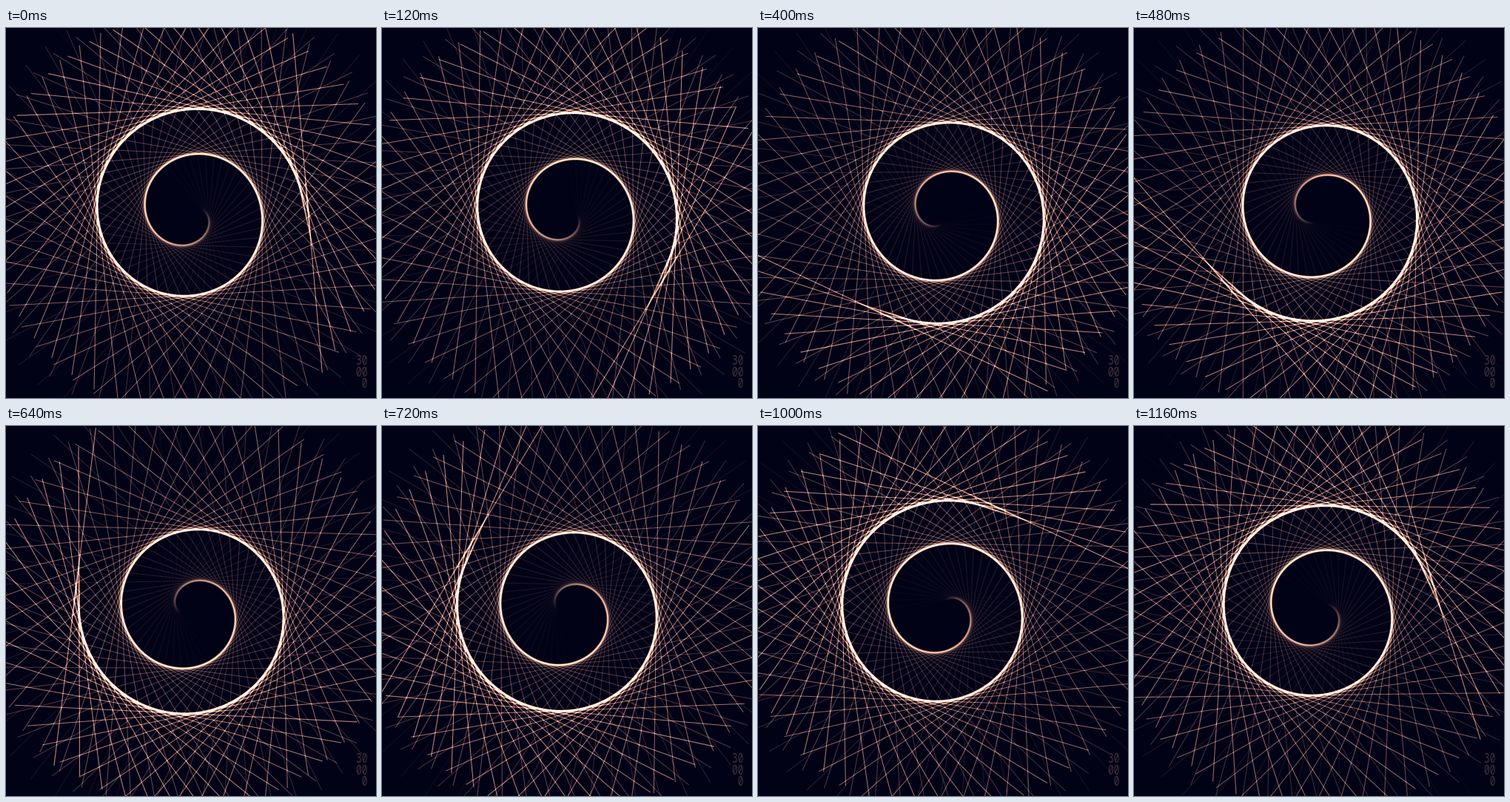
These frames come from a looping animation (500x500 px, 1200 ms). An HTML page with a canvas:

```html
<!DOCTYPE html>
<html lang="en">
<head>
<meta charset="utf-8">
<title>Spiral of lines</title>
<style>
  html, body { margin: 0; width: 100%; height: 100%; overflow: hidden; background: #020216; }
  canvas, svg { position: absolute; left: 0; top: 0; width: 500px; height: 500px; }
  text { font: 13px "Noto Sans Mono", "DejaVu Sans Mono", monospace; fill: #40323b; text-anchor: end; }
</style>
</head>
<body>
<canvas id="stage" width="500" height="500"></canvas>
<svg viewBox="0 0 500 500">
  <g transform="translate(488.5 455) scale(1 1.45)">
    <text y="0">30</text>
    <text y="10.8">00</text>
    <text y="21.4">0</text>
  </g>
</svg>
<script>
const ctx = document.getElementById('stage').getContext('2d');
const LOOP = 1200, STEPS = 30, LINES = 106;
const RAD = Math.PI / 180;
const START = -4.95, SPACING = 7.25, TURN = 360 / STEPS; // degrees

// The newest line stands a little further out than the rest of the spiral.
const distance = i => i === 0 ? 158 : 152.2 - 0.995 * i - 0.0031 * i * i;
const halfLength = (i, d) => i === 0 ? 230 : 335 - 0.745 * d;

function segment(x, y1, y2, width, style) {
  ctx.lineWidth = width;
  ctx.strokeStyle = style;
  ctx.beginPath();
  ctx.moveTo(x, y1);
  ctx.lineTo(x, y2);
  ctx.stroke();
}

// Soft light where a line touches the spiral.
function glow(d, alpha) {
  const mid = 8, reach = 0.36 * d;
  const g = ctx.createLinearGradient(0, mid - reach, 0, mid + reach);
  g.addColorStop(0, 'rgba(255, 165, 105, 0)');
  g.addColorStop(0.5, `rgba(255, 195, 150, ${alpha})`);
  g.addColorStop(1, 'rgba(255, 165, 105, 0)');
  segment(d, mid - reach, mid + reach, 2.6, g);
}

function draw(step) {
  ctx.setTransform(1, 0, 0, 1, 0, 0);
  ctx.globalCompositeOperation = 'source-over';
  ctx.fillStyle = '#020216';
  ctx.fillRect(0, 0, 500, 500);
  ctx.globalCompositeOperation = 'lighter';
  for (let i = 0; i < LINES; i++) {
    const a = (START + TURN * step - SPACING * i) * RAD;
    const c = Math.cos(a), s = Math.sin(a);
    const d = distance(i), half = halfLength(i, d), t = i / LINES;
    ctx.setTransform(c, s, -s, c, 250, 250);
    segment(d, -half, half, 1.05, `rgba(255, 178, 138, ${0.74 * (1 - t)})`);
    glow(d, 0.62 * (1 - t * t));
  }
}

let shown = -1;
function tick() {
  const step = Math.floor(performance.now() % LOOP / LOOP * STEPS);
  if (step !== shown) draw(shown = step);
  requestAnimationFrame(tick);
}
tick();
</script>
</body>
</html>
```
